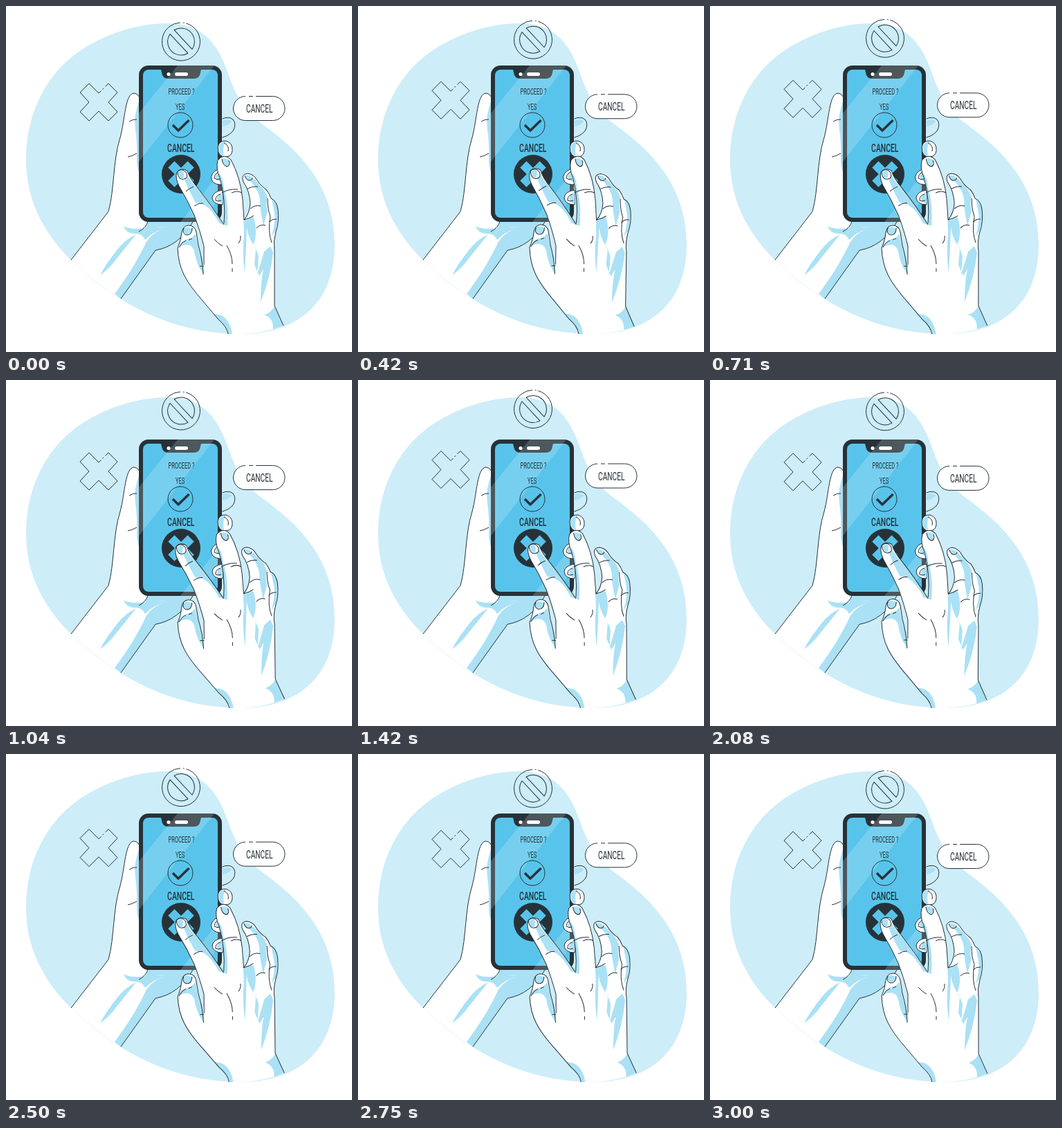
Animation of 500 by 500 pixels, one loop 3040 ms. Source, as an HTML page with a canvas:

```html
<!DOCTYPE html>
<html lang="en">
<head>
<meta charset="utf-8">
<title>Cancel on a phone</title>
<style>
html, body { margin: 0; width: 100%; height: 100%; overflow: hidden; background: #fff; }
canvas { display: block; width: 100vw; height: 100vh; }
</style>
</head>
<body>
<canvas id="stage"></canvas>
<script>
const INK = '#263238', BLUE = '#59c4eb', PALE = '#cdedf9', SHADE = '#abe1f5', WHITE = '#fff';
const LOOP = 3040, CYCLE = 72;
const canvas = document.getElementById('stage');
const ratio = Math.max(1, window.devicePixelRatio || 1);
canvas.width = canvas.height = 500 * ratio;
const ctx = canvas.getContext('2d');

function fill(d, color) {
  ctx.fillStyle = color;
  ctx.fill(new Path2D(d));
}
function line(d, width = 1, color = INK) {
  ctx.strokeStyle = color;
  ctx.lineWidth = width;
  ctx.stroke(new Path2D(d));
}
function shape(d, color = WHITE) {
  fill(d, color);
  line(d);
}
function disc(x, y, r, color) {
  ctx.beginPath();
  ctx.arc(x, y, r, 0, Math.PI * 2);
  ctx.fillStyle = color;
  ctx.fill();
}
function box(x, y, w, h, r, color) {
  ctx.beginPath();
  ctx.roundRect(x, y, w, h, r);
  ctx.fillStyle = color;
  ctx.fill();
}
function moved(x, y, angle, draw) {
  ctx.save();
  ctx.translate(x, y);
  ctx.rotate(angle);
  draw();
  ctx.restore();
}
// One narrow lettering style for every label.
function label(text, x, base, size, weight) {
  ctx.save();
  ctx.translate(x, base);
  ctx.scale(0.62, 1);
  ctx.font = `${weight} ${size}px Roboto, "Liberation Sans", sans-serif`;
  ctx.textAlign = 'center';
  ctx.fillStyle = INK;
  ctx.fillText(text, 0, 0);
  ctx.restore();
}

function blob() {
  fill('M29 222C29 150 62 100 96 73C130 45 185 25 233 25C280 25 304 49 320 95C334 135 345 152 372 172C410 200 475 250 475 345C475 430 420 474 340 474C230 474 150 420 97 370C50 325 29 275 29 222Z', PALE);
}

function banSign() {
  const r = 19.5, h = 4.2, a = Math.asin(h / r);
  ctx.strokeStyle = INK;
  ctx.lineWidth = 1;
  const arc = (from, to) => {
    ctx.beginPath();
    ctx.arc(0, 0, 27.5, from, to);
    ctx.stroke();
  };
  arc(-1.3, Math.PI * 1.5 - 0.04);
  arc(-1.47, -1.4);
  ctx.rotate(0.82);
  for (const start of [a, Math.PI + a]) {
    ctx.beginPath();
    ctx.arc(0, 0, r, start, start + Math.PI - 2 * a);
    ctx.closePath();
    ctx.stroke();
  }
}

function crossSign() {
  line('M3.5 -16.5L0 -13L-14 -27L-27 -14L-14 0L-27 14L-14 27L0 13L14 27L27 14L14 0L27 -14L14 -27L9.5 -22.5M5.5 -18.5L7.2 -20.2');
}

function pill() {
  box(328.5, 130.5, 74, 35, 17.5, WHITE);
  line('M361 130.5H385.5A17.5 17.5 0 0 1 385.5 165.5H346A17.5 17.5 0 0 1 346 130.5M351 130.5H357');
  label('CANCEL', 366.3, 154, 16.5, 400);
}

function floaters(lift) {
  moved(253, 51.5 - lift, 0, banSign);
  moved(134, 139 - lift, 0, crossSign);
  moved(0, -lift, 0, pill);
}

function leftHand() {
  fill('M94 367L148 297C157 265 154 225 165 190C172 165 172 126 185 126Q190 126 193 132L200 312H270Q250 347 216 353L166 423Q130 401 94 367Z', WHITE);
  fill('M193 136Q184 158 187 178Q190 200 189 222Q189 235 194 244Z', SHADE);
  fill('M205 311H270Q250 347 216 353Q206 348 203 341Q210 328 232 320Q218 318 200 324Z', SHADE);
  fill('M170 318Q180 324 203 321Q220 319 233 320Q212 326 201 338Q197 328 185 329Q174 329 170 318Z', SHADE);
  fill('M188 330Q174 337 165 347Q145 371 136 389Q150 379 160 365Z', SHADE);
  fill('M203 340C192 365 175 392 157 416L166 423L216 353Q208 348 203 340Z', SHADE);
  line('M94 367L148 297C157 265 154 225 165 190C172 165 172 126 185 126Q190 126 193 132');
  line('M166 423L216 353Q250 347 270 312M192 326Q203 320 205 311M178 167Q184 163 189 164M176 218Q182 217 189 213');
}

function phone() {
  box(192, 86, 120, 226, 14, INK);
  box(198, 92, 108, 214, 8, BLUE);
  fill('M223 91H283Q281 93 281 96Q280 105 271 105H235Q226 105 225 96Q225 93 223 91Z', INK);
  ctx.save();
  ctx.beginPath();
  ctx.roundRect(192, 86, 120, 226, 14);
  ctx.clip();
  fill('M248 86H301L192 225V155ZM312 237V274L280 312H252Z', 'rgba(255,255,255,.18)');
  ctx.restore();
  disc(235, 98.5, 2.6, WHITE);
  box(244, 96, 19, 5, 2.5, WHITE);

  label('PROCEED ?', 253.5, 128, 12, 400);
  label('YES', 251.5, 150.3, 12, 400);
  label('CANCEL', 252.8, 211.3, 16.8, 500);
  ctx.beginPath();
  ctx.arc(252, 172, 18, 0, Math.PI * 2);
  ctx.lineWidth = 1;
  ctx.strokeStyle = INK;
  ctx.stroke();
  line('M241 172L249 180L264.5 165', 3.4);
  disc(253, 243, 28, INK);
  moved(253, 243, Math.PI / 4, () => {
    ctx.fillStyle = BLUE;
    ctx.fillRect(-20, -6.5, 40, 13);
    ctx.fillRect(-6.5, -20, 13, 40);
  });
}

function gripFingers() {
  shape('M312.5 163Q322 159 328 164Q333 170 329 179Q324 187 312.5 190', PALE);
  fill('M313 166Q321 161 326 167Q321 173 313 174Z', SHADE);
  shape('M306 204Q308 194 318 195Q328 198 327 209Q326 218 317 218Q306 218 306 204Z');
  fill('M307 204Q309 195 318 196Q312 202 315 217Q307 215 307 204Z', SHADE);
  line('M315 198Q323 201 321 210');
  shape('M312 234Q299 237 296.5 247Q297 257 308 258L317 258V234Z');
  fill('M312 236Q303 239 303 247Q305 253 313 255Z', SHADE);
  line('M309 239Q301 242 301 249Q305 252 309 250');
  shape('M313 266Q299 268 298 277Q299 287 313 287Z');
  fill('M313 269Q305 272 305 279Q307 285 313 285Z', SHADE);
  line('M310 272Q302 274 303 281Q307 283 311 281');
}

function tapHand() {
  // pinky, wrist and the back of the hand
  fill('M345 310Q352 300 353 285Q352 267 343 254Q339 243 349 242Q357 243 361 249Q366 258 374 264Q379 270 383 278Q391 281 393 294Q395 312 390 326Q386 340 388 354V433L401 462Q365 476 321 474Q319 464 307 453L285 427Q263 402 257 388Q249 372 248 350Q253 339 254 326Q257 316 265 317Q273 318 275 327L278 346Q284 360 285 370Q286 358 286 347L272 302Q262 280 250 260Q244 248 247 240Q253 233 262 238Q265 249 278 264Q296 287 315 316L316 285Q314 262 309 248Q303 235 306 223Q315 212 325 222Q339 248 342 280Z', WHITE);

  // shading on fingers
  fill('M262 244Q266 253 279 266L315 316L308 314Q293 284 274 284Q263 264 258 251Z', SHADE);
  fill('M308 242Q314 247 315 264Q322 284 320 318L315 316Q318 276 308 242Z', SHADE);
  fill('M349 249Q358 247 363 255Q374 265 378 276Q375 285 378 296L372 318Q369 304 367 288Q369 267 349 249Z', SHADE);
  fill('M384 279Q392 282 393 294Q394 308 390 324L384 332Q390 312 388 299Z', SHADE);
  fill('M274 329Q276 347 284 365L286 388Q275 375 272 354Q267 340 250 348Q254 337 267 336Z', SHADE);

  // shading on the back
  fill('M343 300Q343 311 348 309Q357 301 359 309Q364 331 357 345Q362 351 365 362L363 388Q370 366 373 355L382 347L386 356Q382 393 368 428Q368 400 372 380L366 390L359 374L361 350Q350 336 348 320Q347 350 345 386Q341 357 344 330Z', SHADE);
  fill('M373 446Q382 444 388 434L401 462L386 467Q387 451 373 446Z', SHADE);
  fill('M299 445Q322 444 327 474H321Q318 461 307 453Z', SHADE);

  // nails
  shape('M248 239Q254 234 260 240Q263 246 260 249Q255 252 251 249Q247 244 248 239Z');
  fill('M249 240Q255 235 257 241Q258 247 255 250Q249 249 249 240Z', SHADE);
  fill('M312 221Q319 218 323 225Q324 231 319 233Q313 229 312 221Z', SHADE);
  line('M312 221Q313 230 319 232Q325 231 322 223');
  fill('M345 245Q352 243 356 249Q354 254 349 252Z', SHADE);
  line('M345 245Q347 252 352 252Q357 251 356 248');
  fill('M257 321Q264 317 270 323Q268 331 260 330Q255 327 257 321Z', SHADE);
  line('M257 321Q254 329 261 331Q269 331 269 321');

  // contours
  line('M285 388Q284 365 278 346L275 327Q273 317 264 317Q256 317 254 327Q253 339 248 350Q249 372 257 388Q264 403 285 427L307 453Q319 463 321 474');
  line('M286 374Q286 358 286 347Q280 323 272 302Q262 280 250 260Q244 248 247 240Q253 233 262 238Q265 249 278 264Q296 287 315 316');
  line('M315 314Q318 281 309 248Q303 235 306 223Q315 212 325 222Q339 248 342 280L344 309Q352 300 353 285Q352 267 343 254Q339 243 349 242Q357 243 361 249Q366 258 374 264L376 265Q380 270 383 278Q391 281 393 294Q395 312 390 326Q386 340 388 354V433L401 462');
  line('M378 278Q378 294 382 304Q378 326 384 342');
  line('M260 268Q265 263 271 261M272 289Q279 284 285 285M312 270Q322 264 335 265M326 270Q334 266 341 270M349 264Q356 260 364 261M353 293Q359 287 368 289M380 312Q385 307 391 308M362 321Q367 315 375 317');
  line('M301 337Q306 343 313 347M319 346Q327 360 327 373M327 379V384M336 343Q340 338 339 332M344 309Q352 307 358 303M250 349Q254 341 260 339M264 338L269 336M280 376L286 376');
}

// Swing of the hand: 0, +1 at a quarter, -1 at three quarters, back to 0.
function swing(p) {
  if (p < 0.25) return p * 4;
  return p < 0.75 ? 2 - p * 4 : p * 4 - 4;
}

function draw(t) {
  const step = Math.min(CYCLE, Math.floor((t + 6) * 24 / 1000)) % CYCLE;
  const p = step / CYCLE;
  const lift = 10 * (1 - Math.abs(1 - 2 * p));
  ctx.setTransform(ratio, 0, 0, ratio, 0, 0);
  ctx.clearRect(0, 0, 500, 500);
  ctx.lineJoin = 'round';
  blob();
  floaters(lift);
  leftHand();
  phone();
  gripFingers();
  moved(324, 346, swing(p * 2 % 1) * Math.PI / 180, () => {
    ctx.translate(-324, -346);
    tapHand();
  });
}

const start = performance.now();
function tick() {
  draw((performance.now() - start) % LOOP);
  requestAnimationFrame(tick);
}
tick();
</script>
</body>
</html>
```
